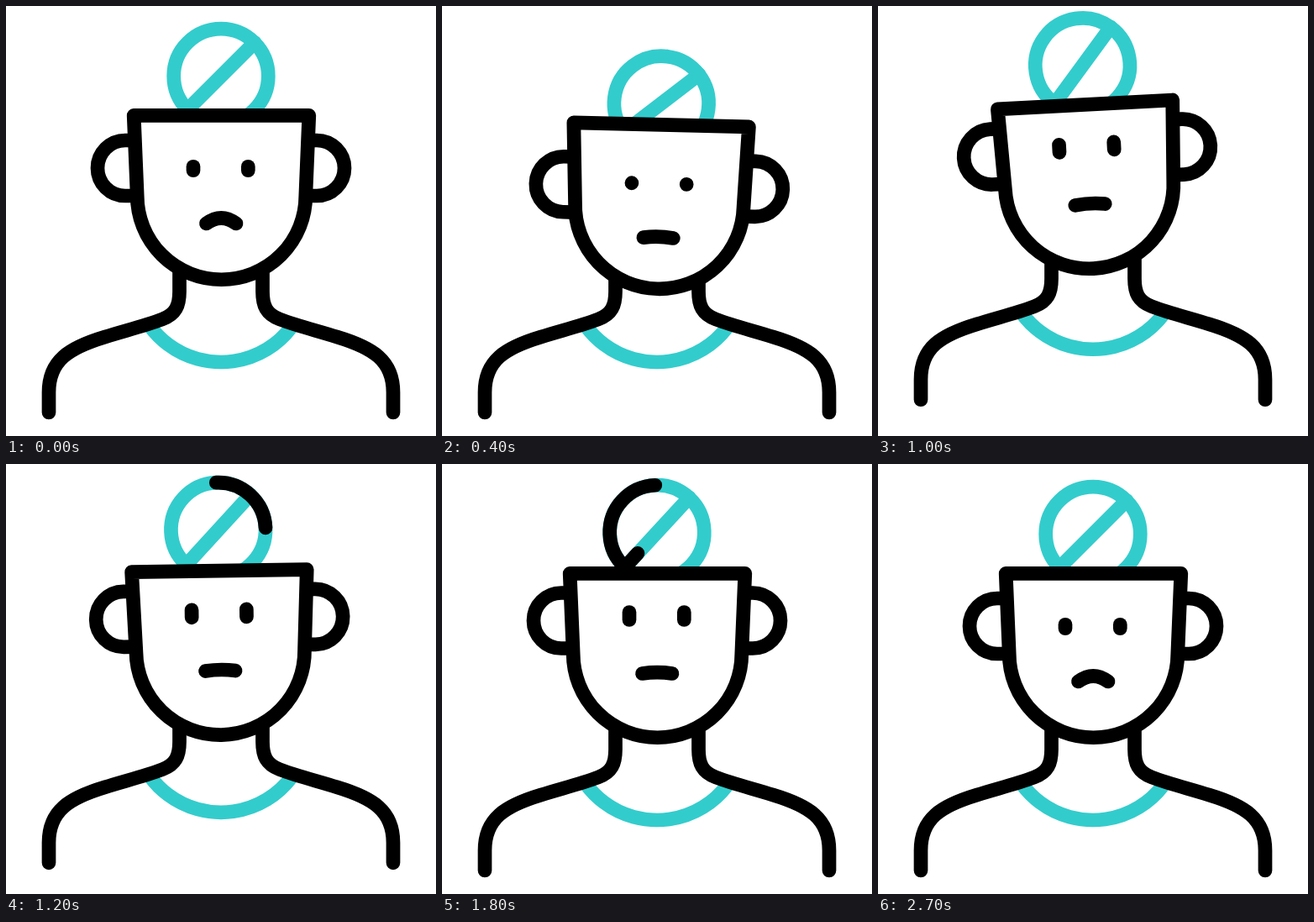
An HTML page with a canvas that plays this animation: 512 px wide and 512 px high, repeating every 2800 ms.

```html
<!DOCTYPE html>
<html lang="en">
<head>
<meta charset="utf-8">
<title>Empty mind</title>
<style>
html, body { margin: 0; width: 100%; height: 100%; overflow: hidden; background: #fff; }
canvas { display: block; width: 512px; height: 512px; }
</style>
</head>
<body>
<canvas id="stage" width="512" height="512"></canvas>
<script>
const ctx = document.getElementById('stage').getContext('2d');
const LOOP = 2800, STEP = 100;
const TEAL = '#33cccc', BLACK = '#000', WHITE = '#fff';
const WEIGHT = 16.7;
const RAD = Math.PI / 180;

// Progress helpers: linear, eased, and an eased rise and fall.
const ramp = (t, from, to) => Math.min(1, Math.max(0, (t - from) / (to - from)));
const ease = (t, from, to) => {
  const u = ramp(t, from, to);
  return u * u * (3 - 2 * u);
};
const pulse = (t, from, peak, to) => ease(t, from, peak) - ease(t, peak, to);

// Winds up until 700 ms, then swings back and forth and dies away.
function swing(t) {
  if (t < 700) return ease(t, 0, 700);
  const since = t - 700;
  return Math.exp(-since / 750) * Math.cos(2 * Math.PI * since / 720) * (1 - ease(t, 1800, 2400));
}

function poseAt(t) {
  const recover = ease(t, 1800, 2400);
  const dip = pulse(t, 0, 400, 650);
  const sag = pulse(t, 0, 400, 1000);
  const look = ease(t, 650, 1000) - recover;
  const calm = ease(t, 0, 400) - recover;
  return {
    bodyY: -20 * pulse(t, 400, 700, 1650),
    headY: 11 * dip - 23.5 * pulse(t, 400, 700, 1350),
    headTurn: 1.4 * sag - 3 * pulse(t, 700, 1000, 1300) + 0.9 * pulse(t, 1200, 1400, 1800),
    signY: 32 * pulse(t, 0, 650, 1000) - 4 * pulse(t, 1000, 1400, 2200),
    signTurn: 10 * swing(t),
    earY: 11 * sag - 6.5 * look,
    eyeY: 193.5 + 7 * dip - 12.5 * look,
    eyeLength: Math.max(0.1, 4.5 * (1 - dip + look)),
    mouthY: 259 + 6 * sag - 9.5 * look,
    frown: 6.5 - 5.2 * calm,
    ringTrim: [ramp(t, 1400, 2200), ramp(t, 1000, 1800)],
    slashTrim: [ramp(t, 1400, 1900), ramp(t, 1230, 1730)]
  };
}

const shoulder = new Path2D('M206.5 316V340C206.5 357 202 367 186 373C165 381 140 387 118 394C75 407 51 422 51 460V484');
const skull = new Path2D('M152.2 130.3H360.8L356.8 226A100.3 99.8 0 0 1 156.2 226Z');
const ears = new Path2D('M152 160H142A33 33 0 0 0 142 226H155M361 160H370A33 33 0 0 1 370 226H358');

function line(x0, y0, x1, y1) {
  const path = new Path2D();
  path.moveTo(x0, y0);
  path.lineTo(x1, y1);
  return path;
}

function arc(x, y, r, from, to) {
  const path = new Path2D();
  path.arc(x, y, r, from * RAD, to * RAD);
  return path;
}

function stroke(path, color = BLACK, cap = 'round') {
  ctx.strokeStyle = color;
  ctx.lineCap = cap;
  ctx.stroke(path);
}

function group(draw) {
  ctx.save();
  draw();
  ctx.restore();
}

function drawBody(p) {
  ctx.translate(0, p.bodyY);
  stroke(arc(256, 319, 105, 37, 143), TEAL, 'butt');
  stroke(shoulder);
  ctx.translate(512, 0);
  ctx.scale(-1, 1);
  stroke(shoulder);
}

function drawSign(p) {
  ctx.translate(256, 83.5 + p.signY);
  ctx.rotate(p.signTurn * RAD);
  const ring = (from, to) => arc(0, 0, 56.3, from * 360 - 90, to * 360 - 90);
  const slash = (from, to) => {
    const at = u => 40 - 80 * u;
    return line(at(from), -at(from), at(to), -at(to));
  };
  stroke(ring(0, 1), TEAL);
  stroke(slash(0, 1), TEAL);
  for (const [shape, [tail, head]] of [[ring, p.ringTrim], [slash, p.slashTrim]]) {
    if (head > tail) stroke(shape(tail, head));
  }
}

function drawFace(p) {
  for (const x of [223, 288.3]) {
    stroke(line(x, p.eyeY - p.eyeLength / 2, x, p.eyeY + p.eyeLength / 2));
  }
  const mouth = new Path2D();
  mouth.moveTo(238.5, p.mouthY);
  mouth.quadraticCurveTo(256.3, p.mouthY - 2 * p.frown, 274, p.mouthY);
  stroke(mouth);
}

function drawHead(p) {
  ctx.translate(256, 320 + p.headY);
  ctx.rotate(p.headTurn * RAD);
  ctx.translate(-256, -320);
  group(() => drawSign(p));
  group(() => {
    ctx.translate(0, p.earY);
    stroke(ears);
  });
  ctx.fillStyle = WHITE;
  ctx.fill(skull);
  stroke(skull);
  drawFace(p);
}

function render() {
  const t = Math.floor(performance.now() % LOOP / STEP) * STEP;
  const pose = poseAt(t);
  ctx.fillStyle = WHITE;
  ctx.fillRect(0, 0, 512, 512);
  group(() => drawBody(pose));
  group(() => drawHead(pose));
  requestAnimationFrame(render);
}

ctx.lineJoin = 'round';
ctx.lineWidth = WEIGHT;
render();
</script>
</body>
</html>
```
